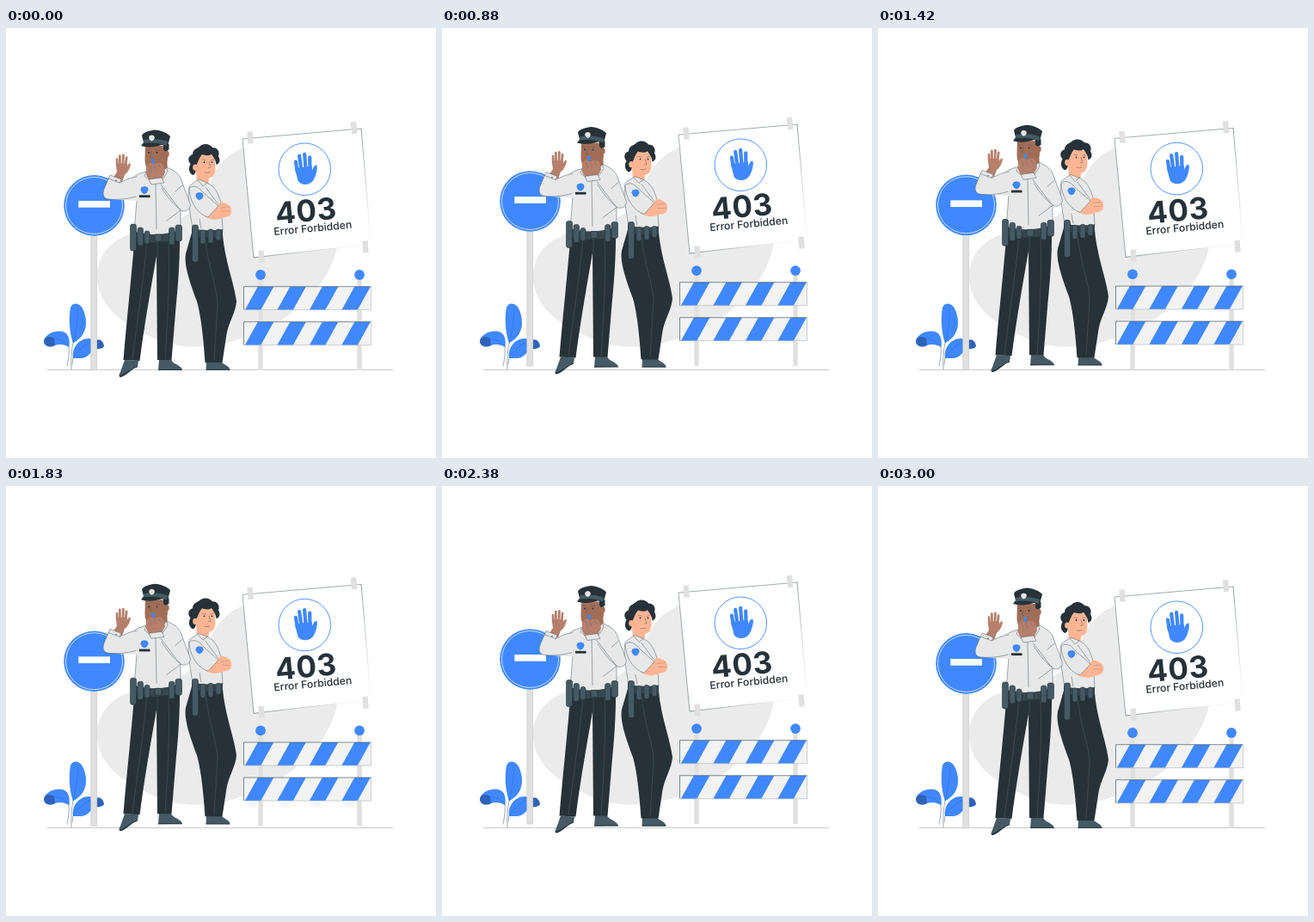
An HTML page for the animation above (3.04 s loop, 500 px wide and 500 px high).

```html
<!DOCTYPE html>
<html lang="en">
<head>
<meta charset="utf-8">
<title>403 Error Forbidden</title>
<style>
  html, body { margin: 0; width: 100%; height: 100%; overflow: hidden; background: #fff; }
  svg { display: block; width: 100vw; height: 100vh; }
  text { font-family: Inter, "Open Sans", sans-serif; fill: #263238; text-anchor: middle; }
  .blue { fill: #4088ff; }
  .navy { fill: #2f63b8; }
  .dark { fill: #263238; }
  .slate { fill: #455a64; }
  .pale { fill: #e0e0e0; }
  .shirt { fill: #e8e8e8; stroke: #455a64; stroke-width: .5; stroke-linejoin: round; }
  .brown { fill: #b57f6b; }
  .face { fill: #a26d57; }
  .peach { fill: #ffb593; }
  .line { fill: none; stroke: #455a64; stroke-width: .5; stroke-linecap: round; stroke-linejoin: round; }
  .vein { fill: none; stroke: #2f63b8; stroke-width: .4; }
  .crease { fill: none; stroke: #455a64; stroke-width: .6; }
</style>
</head>
<body>
<svg viewBox="0 0 500 500">
  <defs>
    <g id="hand">
      <path d="M-11-1 L8-2 V5 C9 2 11-3 13.500-3 C15 0 11 13 6 16 C1 19-6 18-8.500 13Z"/>
      <path d="M-9 2 L-10-9 M-4.200 1 L-5.300-15.500 M1 1 L.8-17 M5.900 1 L6.600-13" fill="none" stroke-width="4.200" stroke-linecap="round"/>
    </g>
    <path id="badge" d="M-3.500-3.500 L0-4.600 L3.500-3.500 L4.600-.5 L3 3 L0 4.700 L-3 3 L-4.600-.5Z"/>
    <linearGradient id="fade">
      <stop stop-color="#455a64"/><stop offset=".7" stop-color="#e6e9ea"/><stop offset="1" stop-color="#fff"/>
    </linearGradient>
    <linearGradient id="fadeDown" x2="0" y2="1">
      <stop stop-color="#455a64"/><stop offset=".5" stop-color="#b4bdc2"/><stop offset="1" stop-color="#fff"/>
    </linearGradient>
  </defs>

  <path fill="#ebebeb" d="M106 290 C106 261 126 242 158 236 C208 229 226 207 237 179 C247 155 265 138 300 132 C345 130 385 180 387 235 C387 290 340 335 290 355 C245 374 200 377 165 357 C130 341 107 321 106 290Z"/>
  <path d="M48 397.500H450" stroke="#bdbdbd" stroke-width=".8"/>

  <g id="plant">
    <path class="blue" d="M78 366.500 C73 352 73 335 75 325 C78 318 86 320 89 326 C93 334 94 344 92 350 C90 358 84 363 78 366.500Z"/>
    <path class="blue" d="M73.500 371 C75 359 71 352 61 352.500 C51 353 44 359 44 365 C45 371 51 371 57 369 C62 367 68 368 73.500 371Z"/>
    <path class="navy" d="M44 364 C45 358 52 358 56 361 L57 369 C52 372 45 371 44 364Z"/>
    <path class="blue" d="M78 384 C76 372 85 361 96 361 C102 361 106 364 104 368 C101 374 97 383 88 384Z"/>
    <path class="navy" d="M101 366 C107 359 113 363 114 370 C112 374 104 374 98 371Z"/>
    <path class="vein" d="M84 327 C83 345 80 358 78 366 M55 361 C64 362 70 366 73 371 M98 365 C89 370 82 377 78 384"/>
    <path class="line" d="M78 366 Q75 380 76 397 M73 371 Q74 380 71 393 M78 384 L77 391"/>
  </g>

  <g class="bob">
    <rect x="98.800" y="238" width="7" height="160" class="pale" stroke="#c8c8c8" stroke-width=".6"/>
    <circle cx="102.500" cy="206.400" r="35.300" class="blue"/>
    <circle cx="102.500" cy="206.400" r="33" fill="none" stroke="#fff" stroke-width=".7"/>
    <rect x="84.300" y="201" width="36.700" height="7.700" fill="#fff"/>
  </g>

  <g class="bob">
    <path fill="#fff" d="M275 129 L413 117 L424.500 251 L288 267Z"/>
    <path d="M288 267 L424.500 251" stroke="url(#fade)" stroke-width=".6"/>
    <path d="M413 117 L424.500 251" stroke="url(#fadeDown)" stroke-width=".6"/>
    <path class="line" stroke-width=".7" d="M288 267 L275 129 L413 117"/>
    <g id="tapes"></g>
    <circle cx="347.300" cy="164.200" r="30.300" fill="#fff" stroke="#4088ff" stroke-width=".9"/>
    <use href="#hand" transform="translate(347.500 163.800) rotate(-4)" class="blue" stroke="#4088ff"/>
    <g transform="translate(350 225) rotate(-5.300)">
      <text font-size="35" font-weight="700" letter-spacing=".6">403</text>
      <text x="6" y="12.500" font-size="12.200" font-weight="500">Error Forbidden</text>
    </g>
  </g>

  <g class="bob" id="barrier"></g>

  <g class="float" id="woman">
    <path class="slate" d="M233 387 H250 C252 392 260 392 260.500 398 H232.500Z"/>
    <path class="dark" d="M232.500 397.200 H260.500 V398 H232.500Z"/>
    <path class="dark" d="M216 238 L252 240 C254 269 266 299 268 318 C267 331 259 342 256.500 356 L251.500 389 H231.500 C230 365 227 335 222 318 C214 296 205 272 210 259Z"/>
    <path class="crease" d="M232 246 C235 278 246 304 246 322 L242 386"/>
    <path class="peach" d="M221 165 L237 168 L235 184 L222 181Z"/>
    <path class="shirt" d="M213 184 C217 180 222 178 224 176 L234 180 L239 183 C245 188 247 194 250 203 L252 235 Q234 238 217 234 C215 219 210 199 213 184Z"/>
    <path class="peach" d="M231 219 C237 211 245 206 250 202.500 C258 203 263 208 262 213 C262 219 257 220 252 220.500 C246 224 237 223 231 219Z"/>
    <path class="line" stroke-opacity=".5" d="M250 209 L259 208 M251 213 L260 213"/>
    <path class="shirt" d="M213 187 C216 182 224 184 229 191 L247 207 L235 220 C225 217 214 205 213 187Z"/>
    <path class="line" d="M223 177 L229 184 L234 180 M232 185 L246 204 M225 222 L227 233"/>
    <use href="#badge" x="225" y="195.500" class="blue"/>
    <path fill="#37474f" d="M216 233 Q234 237 252 234 V243 Q234 245 216 242Z"/>
    <g class="pouches" data-boxes="216.500,229,7,43 226,235,6,16 235,234,6,16 244,234,6,13"></g>
    <path class="peach" d="M219 149 C226 143 242 146 243 153 L243.500 164 C243 171 240 174.500 235 174.500 C227 174 221 169 219 162Z"/>
    <path class="dark" d="M217 171 C211 167 213 161 214.500 158 C210 153 213 148 217 147 C217 140 224 140 226 137 C232 133 238 136 240 139 C246 139 249 144 247 149 C250 154 248 158 244.500 159 C244 153 241 150 239 147 C235 149 231 148 228 147 C224 151 223 158 220 162 C222 168 219 171 217 171Z"/>
    <ellipse cx="220" cy="162" rx="2.800" ry="3.600" class="peach"/>
    <path class="line" d="M228 153 L232 153.500 M238 154 L241 153 M236 156 L238 162 L235.500 162.500 M231 168 Q234 169 237 167.500"/>
    <circle cx="230.500" cy="156" r=".9" class="dark"/><circle cx="239.500" cy="156" r=".9" class="dark"/>
  </g>

  <g class="float" id="man">
    <path class="slate" d="M138 386 L154 387 L153 394 C146 396 140 405 133 406 Q130 405 133 400Z"/>
    <path class="slate" d="M178 385 H192 C193 391 203 391 205 397.500 L177 398Z"/>
    <path class="dark" d="M131.500 404.500 C139 403 144 396 153 393.200 L152.500 394.500 C145 396 140 404 133 406Z M177 397 H204.700 L205 398 H177Z"/>
    <path class="dark" d="M150 238 H202 C202.500 269 200 300 197.500 325 L192.500 386 H176 L175 265 C167 311 161 345 155.500 387 L136.500 386 C140 343 146 290 150 238Z"/>
    <path class="crease" d="M164 248 C159 300 152 345 147 385 M189 248 C191 300 187 350 185 385 M176 248 V270"/>
    <path class="face" d="M163 158 L187 150 L188 166 L174 179 L163 171Z"/>
    <path class="shirt" d="M147 174 C154 169 160 168 163 167 L172 176 L187 162 C197 166 203 171 205 180 L214 204 C216 210 209 215 203 212 L203 237 Q177 245 149 238 L152 200Z"/>
    <use href="#hand" transform="translate(135.300 159) rotate(3) scale(.66)" class="brown" stroke="#b57f6b"/>
    <path class="brown" d="M130 166 L139 168 L135 179 L124 175Z"/>
    <path class="shirt" style="stroke: none" d="M121 171 L134 176 L132 180 C140 176 148 172 156 171 L153 201 C140 200 130 200 119 199 C112 198 112 191 115 185Z"/>
    <path class="line" d="M152 173 C143 174 137 178 132 180 L134 176 L121 171 L115 185 C112 192 112 198 119 199 C130 200 141 199 151 196 M119 175 L132 180"/>
    <circle cx="128" cy="177.300" r=".7" class="dark"/>
    <path class="line" d="M163 167 L161 172 L170 180 L174 177 M187 163 L188 167 L182 176 M174 181 L175 234 M180 182 L202 211 M203 211 C196 207 188 197 181 186 M187 224 L203 212 M205 183 L197 190"/>
    <use href="#badge" x="161" y="188.500" class="blue"/>
    <rect x="155" y="194.300" width="12.500" height="2.800" class="dark"/>
    <path fill="#37474f" d="M147 236 Q175 245 204 234 V244 Q177 253 147 247Z"/>
    <g class="pouches" data-boxes="144.500,228,7,31 153,232,6.500,21 161,236,6,15 189.500,232,6.500,20 197,229,7.500,19"></g>
    <rect x="173" y="240" width="8" height="8" rx="1" fill="#455a64" stroke="#263238" stroke-width=".8"/>
    <path class="face" d="M162 137 H187 L188 152 C187 162 181 168 171 167 C164 166 161 160 161.500 151Z"/>
    <path class="dark" d="M183 135 H189.500 V141 L186 145 L183 141Z"/>
    <ellipse cx="187" cy="146.500" rx="2.700" ry="3.700" class="face"/>
    <path class="line" d="M163 142 L167 141.500 M173 141.500 L178 142.500 M169 144 L167.500 150 L170 151"/>
    <circle cx="166" cy="145" r=".9" class="dark"/><circle cx="175.500" cy="145" r=".9" class="dark"/>
    <path class="dark" d="M160 133 L158 125 C160 121 168 119 173 118.500 C180 119 188 122 191 126 L188 137 L181 136 C173 139 163 139 157 137Z"/>
    <path class="slate" d="M160 130 C169 128 180 129 188 132 L187 137 C178 133 169 133 160 134Z"/>
    <use href="#badge" transform="translate(169.500 128) scale(.75)" fill="#e6e6e6"/>
    <path class="brown" d="M163 165 C163 159 166 156 169 157 L173 159 C177 155 183 157 184 162 L185 168 L180 178 L168 178 C164 174 162 170 163 165Z"/>
    <path class="line" stroke-opacity=".6" d="M166 159 Q170 162 169 167 M172 160 L174 165 M177 158 L180 163"/>
    <path class="blue" d="M169 152.500 L173 152 L173 157.500 L170.500 158.500Z"/>
    <path class="shirt" d="M166 176 L181 174 L184 180 L169 182Z"/>
  </g>
</svg>
<script>
const LOOP = 3040, CYCLE = 3000, LIFT = 6;
const $ = selector => document.querySelector(selector);
const $$ = selector => [...document.querySelectorAll(selector)];
const rect = (x, y, w, h, attrs = '') =>
  `<rect x="${x}" y="${y}" width="${w}" height="${h}" ${attrs}/>`;

function plank(y) {
  const stripes = [0, 1, 2, 3].map(i => {
    const x = 277.8 + i * 37.5;
    return `<path class="blue" d="M${x} ${y + 27} l15 -27 h18.5 l-15 27Z"/>`;
  }).join('');
  return rect(276.5, y, 148, 27, 'fill="#f3f3f3"') + stripes +
    `<path d="M276.5 ${y + 27} V${y} H424.5" fill="none" stroke="#455a64" stroke-width=".7"/>` +
    `<path d="M424.5 ${y} V${y + 27} H276.5" fill="none" stroke="#a9b4bb" stroke-width=".6"/>`;
}

$('#barrier').innerHTML = [296, 411].map(x =>
  rect(x - 2.7, 287, 5.4, 111, 'class="pale"') +
  `<circle class="blue" cx="${x}" cy="287" r="5.9"/>`).join('') + plank(300.7) + plank(341.7);

$('#tapes').innerHTML = [[284, 127.5], [404.5, 116], [297, 265.5], [418, 254.5]].map(([x, y]) =>
  rect(x - 3.2, y - 7, 6.4, 14, `class="pale" transform="rotate(-5 ${x} ${y})"`)).join('');

$$('.pouches').forEach(group => {
  group.innerHTML = group.dataset.boxes.split(' ').map(box =>
    rect(...box.split(','), 'rx="2.5" fill="#455a64" stroke="#263238" stroke-width=".6"')).join('');
});

const bobbing = $$('.bob'), floating = $$('.float');

// Linear rise and fall, 0 to 1 to 0.
const triangle = (time, period) => 1 - Math.abs(1 - 2 * (time % period) / period);
const raise = (parts, amount) =>
  parts.forEach(part => part.setAttribute('transform', `translate(0 ${-LIFT * amount})`));

function draw(now) {
  const time = Math.min(now % LOOP, CYCLE);
  raise(bobbing, triangle(time, CYCLE / 2));
  raise(floating, triangle(time, CYCLE));
}

const start = performance.now();
function tick() {
  draw(performance.now() - start);
  requestAnimationFrame(tick);
}
tick();
</script>
</body>
</html>
```
